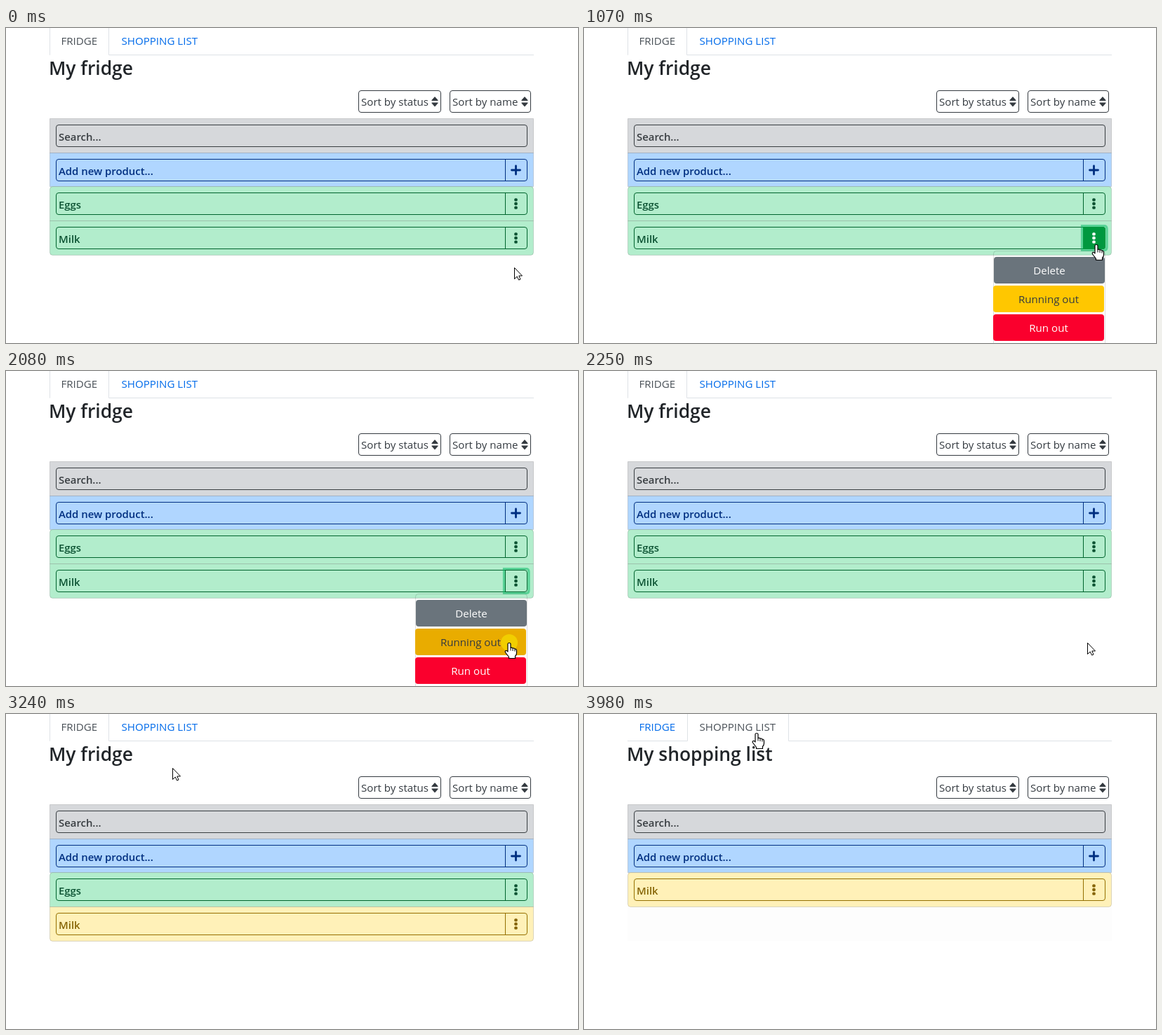
An HTML page that plays this animation: 815 by 450 pixels, repeating every 5.05 s.

```html
<!DOCTYPE html>
<html lang="en">
<head>
<meta charset="utf-8">
<title>My fridge</title>
<style>
  html, body { margin: 0; width: 100%; height: 100%; overflow: hidden; background: #fff; }
  svg { display: block; width: 815px; height: 450px; }
  text { font: 15.1px 'Open Sans', 'Noto Sans', sans-serif; white-space: pre; }
  .strong { font-weight: 600; font-size: 14.9px; }
  .title { font-weight: 600; font-size: 26.4px; }
</style>
</head>
<body>
<svg id="stage" viewBox="0 0 815 450"></svg>
<script>
const LOOP = 5050;
const stage = document.getElementById('stage');

const GREY = { bg: '#d6d8db', ink: '#383d41' };
const BLUE = { bg: '#b0d6ff', ink: '#002f80' };
const GREEN = { bg: '#b2edcc', ink: '#0b5232', line: '#00642d', solid: '#00983f' };
const YELLOW = { bg: '#fff1b8', ink: '#856404', line: '#947000' };

// Easing: fraction of the way -> fraction of the distance
const smooth = u => u * u * (3 - 2 * u);
const easeOut = power => u => 1 - (1 - u) ** power;

// The pointer advances in discrete steps at the listed times.
const START = [724, 342];
const moves = [
  { to: [731, 304], at: [60, 140, 220, 290, 370, 440], x: smooth, y: smooth },
  { to: [717, 388], at: [1070, 1160, 1230, 1310, 1390, 1460, 1540], x: smooth, y: smooth },
  { to: [207, 142], at: [2640, 2720, 2790, 2870, 2940, 3020, 3090], x: smooth, y: smooth },
  { to: [246, 27], at: [3180, 3240, 3330, 3410, 3480, 3560], x: easeOut(3.6), y: easeOut(2.05) }
];
const clicks = [[520, 620], [2080, 2160], [3730, 3800]];

const within = (t, [from, to]) => t >= from && t < to;

function pointerAt(t) {
  let [x, y] = START;
  for (const m of moves) {
    const u = m.at.filter(s => s <= t).length / m.at.length;
    x += (m.to[0] - x) * m.x(u);
    y += (m.to[1] - y) * m.y(u);
  }
  return { x: Math.round(x), y: Math.round(y) };
}

// Drawing helpers
const text = (x, y, str, fill, attrs = '') =>
  `<text x="${x}" y="${y}" fill="${fill}" ${attrs}>${str}</text>`;
const path = (d, attrs) => `<path d="${d}" ${attrs}/>`;
const box = (x, y, w, h, r, attrs) =>
  `<rect x="${x}" y="${y}" width="${w}" height="${h}" rx="${r}" ${attrs}/>`;

function row(y, h, color, top, bottom) {
  const d = `M62.5 ${y + top}q0 ${-top} ${top} ${-top}H${751.5 - top}q${top} 0 ${top} ${top}` +
    `V${y + h - bottom}q0 ${bottom} ${-bottom} ${bottom}H${62.5 + bottom}q${-bottom} 0 ${-bottom} ${-bottom}Z`;
  return path(d, `fill="${color.bg}" stroke="#000" stroke-opacity=".14"`);
}

function field(y, label, color) {
  return box(71.5, y, 671, 31, 3.5, `fill="none" stroke="${color.line || color.ink}"`) +
    text(75, y + 22.5, label, color.ink, 'class="strong"');
}

const divider = (y, color) => path(`M711.5 ${y}v31`, `stroke="${color.line || color.ink}"`);

const dots = (y, fill) => [-5.6, 0, 5.6].map(d =>
  box(724.2, y + d - 2.2, 4.6, 4.4, 1.9, `fill="${fill}"`)).join('');

function product(y, label, color, hovered, focused) {
  let out = field(y, label, color) + divider(y, color);
  if (focused) {
    out += path(`M709.5 ${y - 2}H741q4 0 4 4V${y + 29}q0 4 -4 4H709.5Z`,
      'fill="none" stroke="#00b862" stroke-opacity=".5" stroke-width="3.2"');
  }
  if (hovered) {
    out += path(`M711 ${y - .5}H739.5q3.5 0 3.5 3.5V${y + 28}q0 3.5 -3.5 3.5H711Z`, `fill="${color.solid}"`);
  }
  return out + dots(y + 15.5, hovered ? '#fff' : color.ink);
}

function sortButton(x, w, label) {
  const icon = x + w - 9;
  return box(x + .5, 89.5, w - 1, 31, 3.5, 'fill="none" stroke="#343a40"') +
    text(x + 4, 111, label, '#343a40') +
    path(`M${icon} 98.8l4 4.6h-8ZM${icon} 111.6l4 -4.6h-8Z`,
      'fill="#343a40" stroke="#343a40" stroke-width="1.2" stroke-linejoin="round"');
}

function tabs(shopping, hovered) {
  const blue = '#006bea';
  const [left, right] = shopping ? [147.5, 291.5] : [62.5, 146.5];
  const secondInk = shopping ? '#495057' : hovered ? '#0050b0' : blue;
  const edge = `M62 38.5H${left}V0M${right} 0V38.5H752`;
  return (hovered && !shopping ? path('M147.5 0V38M291.5 0V38', 'fill="none" stroke="#e9ecef"') : '') +
    path(edge, 'fill="none" stroke="#dee2e6"') +
    text(78.5, 24, 'FRIDGE', shopping ? blue : '#495057') +
    text(164.5, 24, 'SHOPPING LIST', secondInk);
}

const options = [
  { x: 584, y: 327, label: 'Delete', fill: '#6a747c', hover: '#5a6268', ink: '#fff' },
  { x: 583, y: 368, label: 'Running out', fill: '#ffc700', hover: '#e9ac00', ink: '#343a40' },
  { x: 583, y: 409, label: 'Run out', fill: '#fa002d', hover: '#d80027', ink: '#fff' }
];
const overOption = (o, p) => within(p.x, [583, 742]) && within(p.y, [o.y, o.y + 38]);

function menu(p, focused) {
  return box(583.5, 318.5, 159, 150, 4, 'fill="none" stroke="#000" stroke-opacity=".13"') +
    options.map((o, i) =>
      (focused && i === 1
        ? box(o.x - 1.6, o.y - 1.6, 161.2, 41.2, 5, 'fill="none" stroke="#ffc700" stroke-opacity=".5" stroke-width="3.2"')
        : '') +
      box(o.x, o.y, 158, 38, 4, `fill="${overOption(o, p) ? o.hover : o.fill}"`) +
      text(o.x + 79, o.y + 25, o.label, o.ink, 'text-anchor="middle"')).join('');
}

const cursors = {
  arrow: path('M.5 .5V16.5L4.2 13L6.6 18L9 17L6.8 12H11.5Z', 'fill="#fff" stroke="#000"'),
  beam: path('M-3 -7.5H-1Q0 -7.5 0 -6.5Q0 -7.5 1 -7.5H3M0 -6.5V6.5M-3 7.5H-1Q0 7.5 0 6.5Q0 7.5 1 7.5H3',
    'fill="none" stroke="#000"'),
  hand: path('M-2 13V2Q-2 .5 0 .5T2 2V7.5Q3.5 6.5 5 8.2Q6.8 7.3 8 9.2Q10.5 8.8 10.5 11.5V15' +
    'Q10.5 17.5 8.5 19.5V22.5H-.5V20.5L-5.5 14Q-6.3 12.2 -5 11.5Q-3.5 11 -2 13Z',
    'fill="#fff" stroke="#000" stroke-width="1.2" stroke-linejoin="round"') +
    path('M2 7.5V11.5M5 8.5V12M8 9.5V12.5', 'stroke="#000"')
};

function scene(t) {
  const p = pointerAt(t);
  const shopping = t >= 3980;
  const runningOut = t >= 2410;
  const menuOpen = within(t, [690, 2250]);
  const overTab = within(p.x, [147, 292]) && p.y < 38;
  const overMilk = within(p.x, [711, 743]) && within(p.y, [284, 316]);
  const overMenu = menuOpen && options.some(o => overOption(o, p));
  const overField = within(p.x, [71, 711]) && [138, 187, 235, 284].some(y => within(p.y, [y, y + 32]));
  const cursor = overTab || overMilk || overMenu ? 'hand' : overField && !menuOpen ? 'beam' : 'arrow';

  let out = tabs(shopping, overTab) +
    text(61, 67, shopping ? 'My shopping list' : 'My fridge', '#212529', 'class="title"') +
    sortButton(502, 118, 'Sort by status') + sortButton(632, 116, 'Sort by name') +
    row(129.5, 49, GREY, 0, 0) + field(138.5, 'Search...', GREY) +
    row(178.5, 48, BLUE, 0, 0) + field(187.5, 'Add new product...', BLUE) + divider(187.5, BLUE) +
    path('M720.5 203H732.5M726.5 197V209', `stroke="${BLUE.ink}" stroke-width="2.8" stroke-linecap="round"`);

  if (shopping) {
    out += box(62, 276, 690, 48, 0, 'fill="#fdfdfd"') +
      row(226.5, 49, YELLOW, 4, 4) + product(235.5, 'Milk', YELLOW);
  } else {
    out += row(226.5, 49, GREEN, 4, 0) + product(235.5, 'Eggs', GREEN) +
      row(275.5, 49, runningOut ? YELLOW : GREEN, 0, 4) +
      product(284.5, 'Milk', runningOut ? YELLOW : GREEN, overMilk, within(t, [620, 2160]));
  }
  if (menuOpen) out += menu(p, t >= 2160);
  if (clicks.some(c => within(t, c))) {
    out += `<circle cx="${p.x}" cy="${p.y}" r="12" fill="#faf000" fill-opacity=".5"/>`;
  }
  return out + `<g transform="translate(${p.x} ${p.y})">${cursors[cursor]}</g>`;
}

let shown = '';
const began = performance.now();
function update() {
  const markup = scene((performance.now() - began) % LOOP);
  if (markup !== shown) stage.innerHTML = shown = markup;
  requestAnimationFrame(update);
}
update();
</script>
</body>
</html>
```
